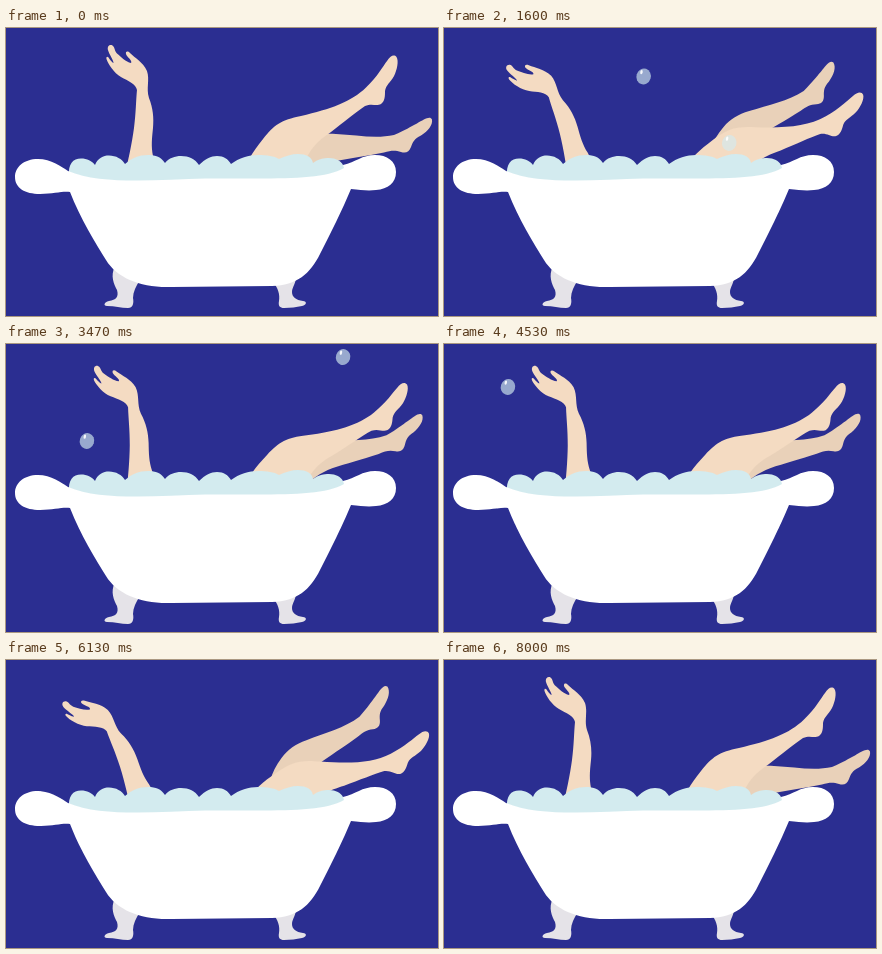
An HTML page that plays this animation: 432x288 px, repeating every 8.07 s.

```html
<!DOCTYPE html>
<html lang="en">
<head>
<meta charset="utf-8">
<title>Bubble bath</title>
<style>
  html, body { margin: 0; width: 100%; height: 100%; overflow: hidden; background: #2b2e91; }
  svg { display: block; width: 100vw; height: 100vh; }
  .skin { fill: #f4dbc2; }
  .shade { fill: #e9d1b9; }
  .foam { fill: #d3ebef; }
  .feet { fill: #e5e3e8; }
  .white { fill: #fff; }
</style>
</head>
<body>
<svg viewBox="0 0 432 288">
  <rect width="432" height="288" fill="#2b2e91"/>

  <path id="farLeg" class="shade" d="M268 150C274 132 284 120 300 111.500C310 106.500 318 105 330 106
    C350 107 370 111 388 107C400 102 404 99 411 95.500C418 91.500 424 87.500 426 91.500C427 97 422 103 415 107.500
    C408 111 407 114 405 119C403 124 400 125.500 395 124C389 122 385 122.500 378 124.500C360 128 345 130 330 133
    C318 136 305 142 298 152Z"/>

  <path id="nearLeg" class="skin" d="M236 150C240 134 246 125 257 111C268 97 275 92 295 88C325 81 345 74 360 59.500
    C372 48 377 38 381 33C384 28 388 26 390.500 29C393 33 391 42 388 48C384 55 380 57 379 63C379 68 379 73 375 76
    C370 78.500 366 75 359 78C350 84 338 94 325 104C312 113 303 119 292 150Z"/>

  <path id="arm" class="skin" d="M118 150C122 134 126 115 128 100C130 85 130 72 131 62C130 56 122 53 115 49
    C108 45 102 36 100.500 31C100 28 102 28 103.500 31C105 33 107 35 107.500 35C108 33 103 26 102 22
    C101 18 104 16 106.500 17.500C109 19 108 22 111 25.500C115 29 120 34 125 35C127 33 121 29 120 26
    C119.500 23 122 23 124 25C129 30 137 34 141 43C144 52 140 60 143 70C147 80 148 90 147 100
    C146 110 145 118 147 128L149 150Z"/>

  <g id="bubbles"></g>

  <path class="foam" d="M63 148C62 136 67 130.500 75 130.500C81 130.500 86 133 89 137C92 130 97 127.500 103 127.500
    C110 127.500 116 131 119 136C126 130 133 127 142 127C150 127 155 129 159 135C163 130 169 128 175 128
    C183 128 189 131 193 137C199 131 205 128 211 128C218 128 222 131 225 136C233 130 243 127 252 127
    C261 127 268 128 273 131C279 128 286 126 292 126C300 126 306 129 307 135C312 131 318 130 323 130
    C330 130 335 133 337 137L342 138L330 155H70Z"/>

  <path class="feet" d="M109 238C104 248 108 256 111 262C113 269 110 272 103 273C98 274 97 278 101 278
    C109 278 115 280 122 280C127 280 128 275 127 270C127 264 130 258 134 252Z"/>
  <path class="feet" d="M267 254C272 260 274 266 273 273C272 278 274 280 278 280C285 280 290 279 296 278
    C301 277 301 273 297 273C290 272 286 269 286 264C286 259 291 254 290 246Z"/>

  <path class="white" d="M62 143C56 139 45 131 32 131C18 131 9 139 9 149C9 160 19 166 34 166C48 166 56 163 64 164
    C74 190 90 216 100 232C111 250 135 260 165 259L266 258C291 257 304 246 314 226C325 204 336 183 345 161
    C355 162 362 163 370 162C382 161 390 155 390 144C390 133 381 127 369 127C356 127 350 134 337 137
    L338 140C315 153 270 150 200 150.500C150 152 95 157 62 143Z"/>
</svg>
<script>
const LOOP = 8070, SWING = 2000;

// Each limb turns rigidly about a joint in the water; reach is in degrees
const LIMBS = [
  { id: 'arm', x: 137, y: 135, reach: -26.7 },
  { id: 'nearLeg', x: 260, y: 158, reach: 18.5 },
  { id: 'farLeg', x: 257, y: 160, reach: -26.7 }
];

// Birth time in ms, starting x, drift and rise in px per ms
const BUBBLES = [
  { born: 0, x: 193, drift: 0, rise: 0.0603 },
  { born: 1050, x: 265, drift: 0.029, rise: 0.0545 },
  { born: 2530, x: 88.5, drift: -0.0147, rise: 0.051 }
];

const bubbleBox = document.getElementById('bubbles');
for (const limb of LIMBS) limb.el = document.getElementById(limb.id);
for (const bubble of BUBBLES) {
  bubble.el = document.createElementNS('http://www.w3.org/2000/svg', 'g');
  bubble.el.innerHTML =
    '<ellipse class="foam" rx="7.2" ry="8" transform="rotate(18)" opacity=".65"/>' +
    '<ellipse class="white" cx="-3" cy="-3.8" rx="1.2" ry="2.2" transform="rotate(12)" opacity=".9"/>';
  bubbleBox.append(bubble.el);
}

function draw(t) {
  // Steady swing out and back, resting briefly at the loop's end
  const turn = Math.min(t, SWING * 4) / SWING % 2;
  const swing = 1 - Math.abs(1 - turn);
  for (const { el, x, y, reach } of LIMBS) {
    el.setAttribute('transform', `rotate(${reach * swing} ${x} ${y})`);
  }
  for (const { el, born, x, drift, rise } of BUBBLES) {
    const age = t - born;
    const sway = 7 * Math.sin(Math.PI * age / 2650);
    el.style.display = age < 0 ? 'none' : '';
    el.setAttribute('transform', `translate(${x + drift * age + sway} ${145 - rise * age})`);
  }
}

const start = performance.now();
function tick() {
  draw((performance.now() - start) % LOOP);
  requestAnimationFrame(tick);
}
tick();
</script>
</body>
</html>
```
